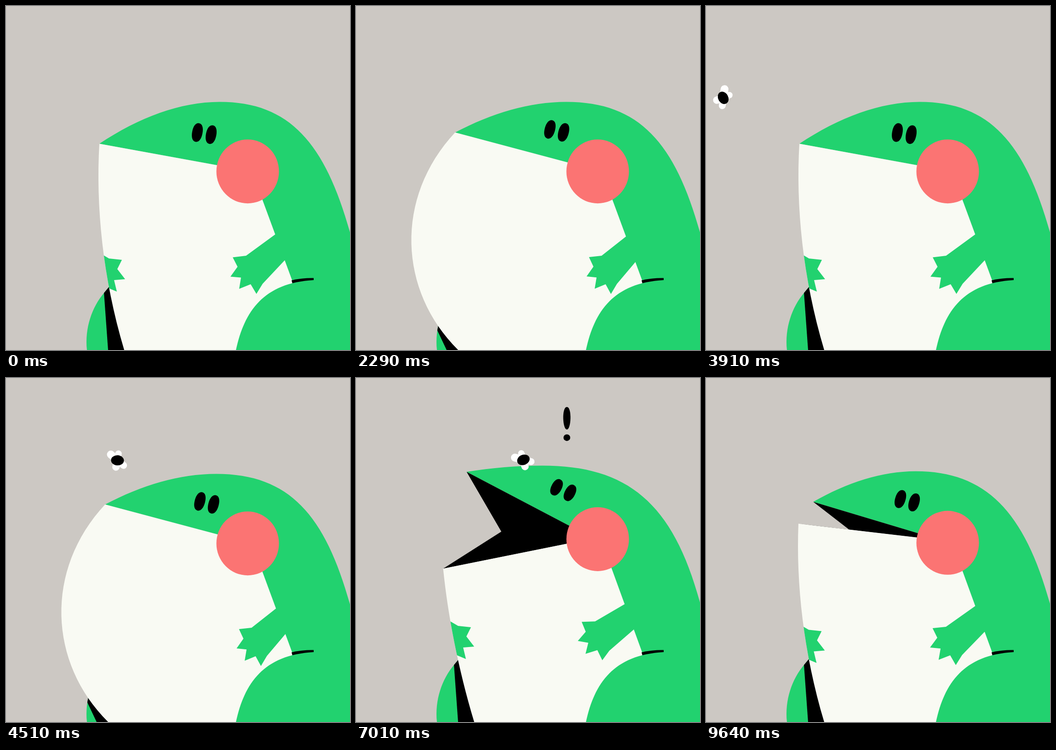
Write an HTML page with a canvas that moves like this. It is 748 px wide and 748 px high and loops after 9.71 s.

```html
<!DOCTYPE html>
<html lang="en">
<head>
<meta charset="utf-8">
<title>Frog and fly</title>
<style>
html, body { margin: 0; width: 100%; height: 100%; overflow: hidden; background: #ccc8c3; }
canvas { display: block; }
</style>
</head>
<body>
<canvas id="stage" width="748" height="748"></canvas>
<script>
const LOOP = 9710, STEP = 70;
const ENTER = 3810, LAND = 4710, OPEN = 5840, LEAVE = 7010, GONE = 8070;
const GREY = '#ccc8c3', GREEN = '#22d26f', CREAM = '#f9faf3', PINK = '#fb7473', BLACK = '#000', WHITE = '#fff';
const REST_TILT = 10.3; // degrees of the closed mouth line
const ctx = document.getElementById('stage').getContext('2d');

const rad = deg => deg * Math.PI / 180;
const ease = u => u < .5 ? 4 * u ** 3 : 1 - 4 * (1 - u) ** 3;
const snap = (t, from, step) => from + step * Math.floor((t - from) / step);
const add = (a, b) => [a[0] + b[0], a[1] + b[1]];

function rotate([x, y], deg) {
  const c = Math.cos(rad(deg)), s = Math.sin(rad(deg));
  return [x * c - y * s, x * s + y * c];
}
function bezier(a, b, c, d, u) {
  const v = 1 - u;
  return [0, 1].map(i => v ** 3 * a[i] + 3 * v * v * u * b[i] + 3 * v * u * u * c[i] + u ** 3 * d[i]);
}

function shape(color, path) {
  ctx.fillStyle = color;
  ctx.beginPath();
  path();
  ctx.fill();
}
const trace = points => points.forEach(p => ctx.lineTo(...p));
const poly = (color, points) => shape(color, () => trace(points));
const oval = (color, x, y, rx, ry, turn = 0) =>
  shape(color, () => ctx.ellipse(x, y, rx, ry, rad(turn), 0, 7));

function placed(x, y, turn, scaleX, scaleY, draw) {
  ctx.save();
  ctx.translate(x, y);
  ctx.rotate(rad(turn));
  ctx.scale(scaleX, scaleY);
  draw();
  ctx.restore();
}
function clipped(path, draw) {
  ctx.save();
  ctx.beginPath();
  path();
  ctx.clip();
  draw();
  ctx.restore();
}

// Belly size: each breath swells in three steps and shrinks in three.
function puffAt(t) {
  if (t < 700 || t >= LAND) return 0;
  const s = (t - 700) % 1080;
  const rise = s => s < 0 ? 0 : ease(Math.min(1, (Math.floor(s / STEP) + 1) / 3));
  return 1.17 * (rise(s) - rise(s - 510));
}

// Mouth opening from 0 to 1, three steps each way.
function gapeAt(t) {
  if (t < OPEN) return 0;
  return Math.min(3, 1 + Math.floor((t - OPEN) / STEP), Math.ceil((LOOP - t) / STEP)) / 3;
}

function makePose(puff, gape) {
  const lift = gape ** 1.05, drop = gape ** 1.73;
  const base = [203 + 12.5 * puff, 299.5 - 24.5 * puff];
  const nose = add(base, [37.5 * (1 - (1 - lift) ** 4.3), -95.5 * lift]);
  const jaw = add(base, [-13.5 * drop, 115 * drop]);
  const hinge = [535 - 5 * drop, 360 - 4 * drop];
  const tilt = Math.atan2(hinge[1] - nose[1], hinge[0] - nose[0]) * 180 / Math.PI - REST_TILT;
  const perch = add(nose, rotate([95, -53], tilt));
  return { puff, gape, lift, drop, nose, jaw, hinge, tilt, perch };
}

function drawFarLeg({ puff }) {
  const leg = () => {
    ctx.moveTo(176, 748);
    ctx.bezierCurveTo(171, 700, 187, 655, 213, 624);
    trace([[223, 612], [260, 575], [270, 748]]);
  };
  shape(GREEN, leg);
  clipped(leg, () => poly(BLACK, [[211.3 - 84.8 * puff, 600], [222 - 25 * puff, 748], [300, 748], [300, 600]]));
}

function drawHead({ puff, gape, lift, drop, nose, jaw, hinge }) {
  const top = [465 - 8 * puff - 60 * drop, 208.5 - 18 * lift];
  const dx = top[0] - nose[0], dy = top[1] - nose[1];
  shape(GREEN, () => {
    ctx.moveTo(...nose);
    ctx.bezierCurveTo(nose[0] + .33 * dx, nose[1] + .63 * dy, nose[0] + .67 * dx, top[1], ...top);
    ctx.bezierCurveTo(617 - 27 * lift, top[1], 694 - 5 * lift, 299 - 28 * lift, 748, 492 - 4 * lift);
    trace([[748, 748], [500, 748], hinge]);
  });
  const corner = [312 + 4 * lift, 330 + 4 * lift];
  poly(gape ? BLACK : GREEN, [nose, corner, jaw, [530, 360 - 14 * lift], hinge]);
}

function drawBelly({ puff, lift, drop, jaw }) {
  const height = 748 - jaw[1], foot = 257 - 35 * puff;
  const belly = () => {
    ctx.moveTo(...jaw);
    ctx.bezierCurveTo(
      jaw[0] - 8 + 18 * drop - 125 * puff, jaw[1] + .3 * height,
      foot - 47 + 12 * drop - 83 * puff, jaw[1] + (.65 + .08 * puff) * height, foot, 748);
    trace([[678, 748], [625.3, 605], [535 - 4 * drop, 360 - 14.3 * lift]]);
  };
  shape(CREAM, belly);
  const hand = [[200, 535], [212, 542], [224, 549], [252, 552], [242, 572], [259, 594], [235, 596], [241, 621], [200, 604]];
  clipped(belly, () => poly(GREEN, hand.map(p => add(p, [-140 * puff - 2 * lift, -10 * drop]))));
}

function drawArm({ puff, drop }) {
  // Points around the middle of the hand.
  const hand = [[-11, -41.5], [-40, -38], [-29.5, -17.5], [-45, 4], [-22, 6], [-26, 30.5], [-1, 20.5], [11.5, 41.5], [25, 19.5]];
  const middle = [533 + 11 * puff - 5.5 * drop, 584.5 - 13 * drop];
  const moved = hand.map(([x, y]) => add(middle, rotate([x * (1 - .055 * puff), y], .7 * puff + 4.7 * drop)));
  poly(GREEN, [[600, 486 + 5 * puff - 3.5 * drop], ...moved, [620, 538 + 4 * puff - 5 * drop], [650, 510]]);
}

function drawNearLeg() {
  shape(BLACK, () => {
    ctx.moveTo(621, 596.5);
    ctx.quadraticCurveTo(645, 591, 669, 591.5);
    trace([[669, 600], [624, 608]]);
  });
  shape(GREEN, () => {
    ctx.moveTo(500, 748);
    ctx.bezierCurveTo(518, 664, 560, 602, 669, 596);
    trace([[748, 596], [748, 748]]);
  });
}

function drawFace({ lift, drop, tilt }) {
  const cheek = [525.5, 359.7 - 9.3 * drop], turn = .8 * tilt, far = 1 + .04 * lift;
  oval(PINK, ...cheek, 68, 69.5);
  const k = .62; // a little squarer than an ellipse
  for (const offset of [[-109.5, -84.5], [-79.5, -80]]) {
    const [x, y] = add(cheek, rotate(offset.map(v => v * far), turn));
    placed(x, y, 11 + 1.2 * turn, 11.3, 20.5 - 1.5 * lift, () => shape(BLACK, () => {
      ctx.moveTo(0, -1);
      ctx.bezierCurveTo(k, -1, 1, -k, 1, 0);
      ctx.bezierCurveTo(1, k, k, 1, 0, 1);
      ctx.bezierCurveTo(-k, 1, -1, k, -1, 0);
      ctx.bezierCurveTo(-1, -k, -k, -1, 0, -1);
    }));
  }
}

function drawFly([x, y], turn) {
  placed(x, y, turn, 1, 1, () => {
    ctx.strokeStyle = WHITE;
    ctx.lineCap = 'round';
    for (const [wx, wy, width] of [[3, -19, 17], [13.5, -6, 14], [-2, 17, 15], [-14, 5, 16]]) {
      ctx.lineWidth = width;
      ctx.beginPath();
      ctx.moveTo(0, 0);
      ctx.lineTo(wx, wy);
      ctx.stroke();
    }
    oval(BLACK, 0, 0, 14, 11, 61);
  });
}

function moveFly(t, { perch, tilt }) {
  if (t < ENTER || t >= GONE) return;
  if (t < LAND) {
    const u = (t - ENTER) / (LAND - ENTER);
    drawFly(bezier([-5, 230], [125, 125], [230, 150], perch, u), -82 * Math.max(0, (u - .11) / .89));
  } else if (t < LEAVE) {
    drawFly(perch, tilt - 82);
  } else {
    const u = t < LEAVE + 130 ? 0 : (snap(t, LEAVE + 130, 104) - LEAVE) / 960;
    drawFly(bezier([364, 178], [430, -5], [620, 5], [760, 170], u), -84 * (1 - u));
  }
}

function drawAlert(t) {
  if (t < 5980 || t >= 9570) return;
  const size = Math.min(1, .4 * (1 + Math.floor((t - 5980) / 65)));
  placed(458.5, 137, 0, size, size, () => {
    shape(BLACK, () => {
      ctx.moveTo(0, -74);
      ctx.bezierCurveTo(11.5, -74, 9.5, -25, 0, -25);
      ctx.bezierCurveTo(-9.5, -25, -11.5, -74, 0, -74);
    });
    oval(BLACK, 0, -7.3, 7.3, 7.3);
  });
}

function frame() {
  let t = performance.now() % LOOP;
  // While the fly comes in, everything moves on its ticks.
  if (t >= ENTER && t < LAND) t = Math.max(ENTER, snap(t, ENTER + 100, STEP));
  const pose = makePose(puffAt(t), gapeAt(t));
  ctx.fillStyle = GREY;
  ctx.fillRect(0, 0, 748, 748);
  drawFarLeg(pose);
  drawHead(pose);
  drawBelly(pose);
  drawArm(pose);
  drawNearLeg();
  drawFace(pose);
  moveFly(t, pose);
  drawAlert(t);
  requestAnimationFrame(frame);
}
frame();
</script>
</body>
</html>
```
